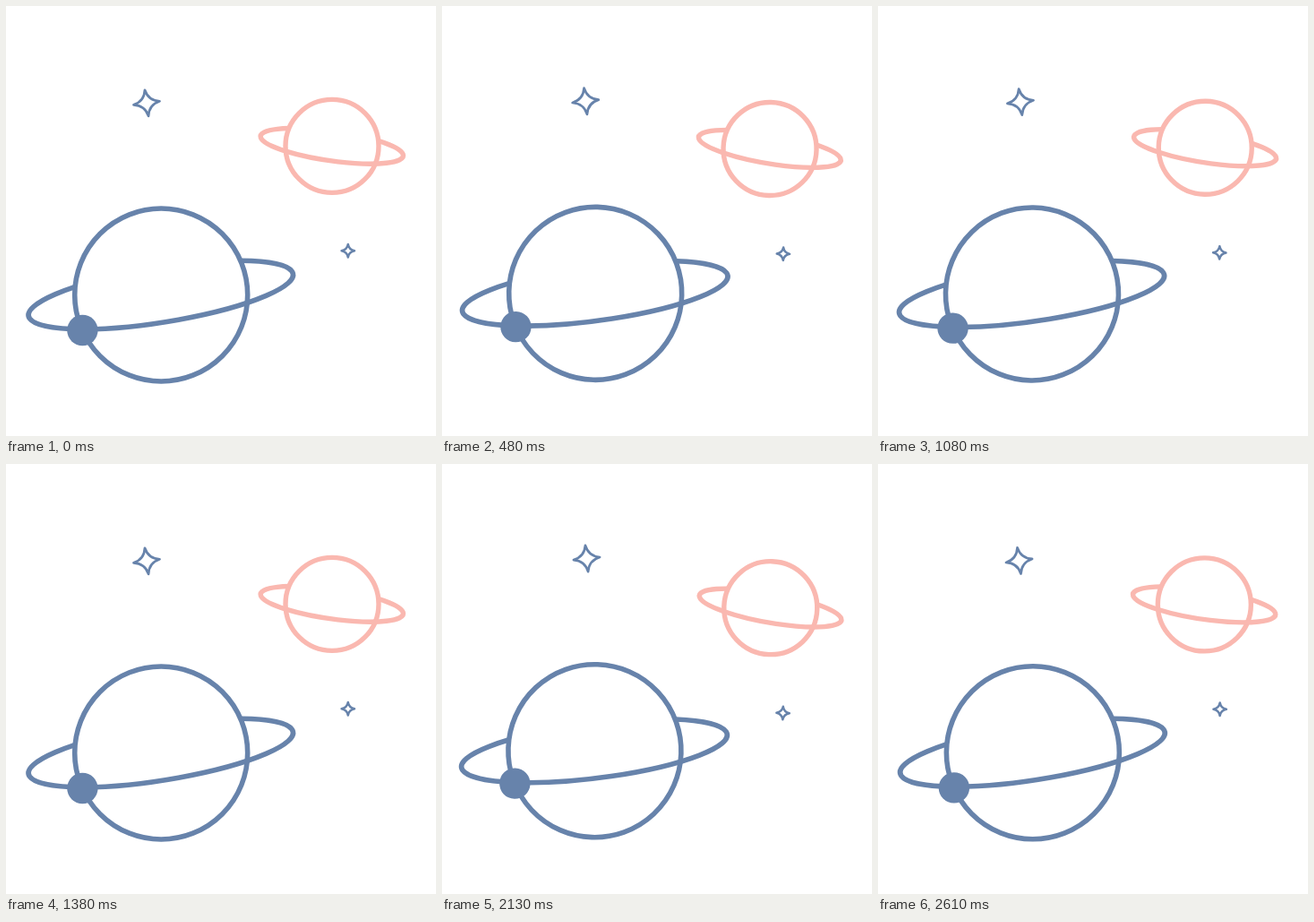
Animation, 480 px wide and 480 px high, one loop 2640 ms. Source, as an HTML page with a canvas:

```html
<!DOCTYPE html>
<html lang="en">
<head>
<meta charset="utf-8">
<title>Rocking planets</title>
<style>
  html, body { margin: 0; width: 100%; height: 100%; overflow: hidden; background: #fff; }
  canvas { display: block; width: 480px; height: 480px; }
</style>
</head>
<body>
<canvas id="stage" width="480" height="480"></canvas>
<script>
const ctx = document.getElementById('stage').getContext('2d');
const BLUE = '#6783ab';
const PINK = '#fab8b0';
const LOOP = 2640;
const TICK = 30;
const SWING_STEPS = 37.5;
const SWING_ANGLE = 2 * Math.PI / 180;

// Five drawing steps are spread over six ticks; the first of each six is held.
function stepAt(ms) {
  const tick = Math.floor((ms % LOOP) / TICK);
  return Math.max(1, 5 * Math.floor(tick / 6) + Math.max(0, tick % 6 - 1));
}

function swingAt(step) {
  const phase = ((step - 1) % SWING_STEPS) / SWING_STEPS;
  const s = 1 - Math.abs(1 - 2 * phase);
  return SWING_ANGLE * s * s * (3 - 2 * s);
}

function disc(x, y, r) {
  ctx.beginPath();
  ctx.arc(x, y, r, 0, 2 * Math.PI);
}

// The ring is a sheared ellipse, left open where it passes behind the planet.
function planet({ x, y, r, color, width, ring }) {
  ctx.strokeStyle = color;
  ctx.lineWidth = width;
  disc(x, y, r);
  ctx.stroke();

  ctx.beginPath();
  ctx.save();
  ctx.transform(ring.reach, ring.tilt, 0, ring.depth, ring.x, ring.y);
  ctx.arc(0, 0, 1, ring.from, ring.to);
  ctx.restore();
  ctx.stroke();
}

function star(x, y, r, angle, width) {
  ctx.save();
  ctx.translate(x, y);
  ctx.rotate(angle);
  ctx.beginPath();
  ctx.moveTo(r, 0);
  for (let i = 1; i <= 4; i++) {
    const tip = i * Math.PI / 2;
    const dip = tip - Math.PI / 4;
    ctx.quadraticCurveTo(0.22 * r * Math.cos(dip), 0.22 * r * Math.sin(dip),
                         r * Math.cos(tip), r * Math.sin(tip));
  }
  ctx.closePath();
  ctx.strokeStyle = BLUE;
  ctx.lineWidth = width;
  ctx.lineJoin = 'round';
  ctx.stroke();
  ctx.restore();
}

const bigPlanet = {
  x: 173.2, y: 322.5, r: 96.5, color: BLUE, width: 5.6,
  ring: { x: 172.8, y: 322.5, reach: 147.7, tilt: -22.5, depth: 31, from: -0.92, to: 4.01 }
};
const smallPlanet = {
  x: 364, y: 156.4, r: 52, color: PINK, width: 5.4,
  ring: { x: 363.8, y: 156.3, reach: 79.7, tilt: 10.7, depth: 16.7, from: -0.87, to: 4.07 }
};

function draw(ms) {
  ctx.fillStyle = '#fff';
  ctx.fillRect(0, 0, 480, 480);
  ctx.save();
  ctx.translate(240, 240);
  ctx.rotate(swingAt(stepAt(ms)));
  ctx.translate(-240, -240);

  planet(bigPlanet);
  disc(85.4, 362, 17.2);
  ctx.fillStyle = BLUE;
  ctx.fill();
  planet(smallPlanet);
  star(157, 108.3, 14.7, -0.14, 2.7);
  star(381.8, 273.2, 7.2, 0, 2.5);
  ctx.restore();
}

const start = performance.now();
function frame() {
  draw(performance.now() - start);
  requestAnimationFrame(frame);
}
frame();
</script>
</body>
</html>
```
